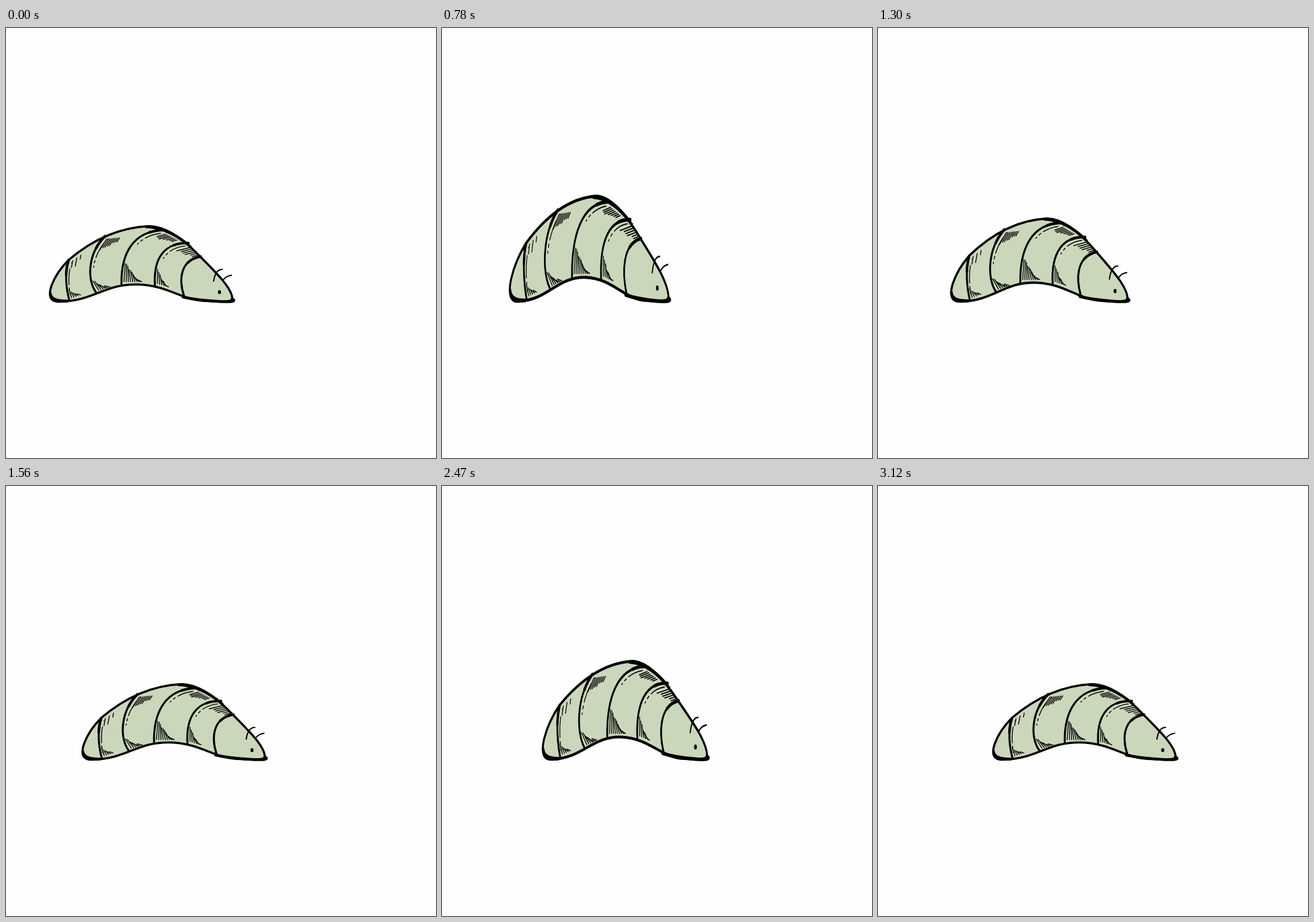
An HTML page with a canvas for the animation above (3250 ms loop, 700 by 700 pixels).

```html
<!DOCTYPE html>
<html lang="en">
<head>
<meta charset="utf-8">
<title>Crawling grub</title>
<style>
  html, body { margin: 0; height: 100%; overflow: hidden; background: #fefefe; }
  canvas { display: block; width: 100vmin; height: 100vmin; }
</style>
</head>
<body>
<canvas width="700" height="700"></canvas>
<script>
const ctx = document.querySelector('canvas').getContext('2d');
const STEP = 130, STEPS = 25, CYCLE = 12;
const GROUND = 447, NOSE = 370.5, LENGTH = 302, HEIGHT = 125;

const body = new Path2D(`M77 443.5 C64 437 75 405 102 377.5 C132 352 176 325 233 322.5
  C262 323 291 346 314 370 C345 401 368 424 368.5 441 C367 447 345 445.5 330 444.5
  C288 445 265 419 215 417.5 C160 416 145 444 88 445.5 Q80 445.5 77 443.5Z`);
const thickBack = new Path2D('M228 323.5 Q264 325 298 354');
const thickBelly = new Path2D('M288 438 Q310 443 345 445 T368 441 M72 432 Q73 445 100 444.5');
const feelers = new Path2D('M338 412 Q341 393 352 393 M354 409.5 Q358 404 367 402.5');

// Each ring runs from the back to the belly; "slope" is that of the belly to its right.
const ring = (curve, slope, crown, foot) => ({ curve, slope, crown, foot });
const rings = [
  ring([102, 378, 95, 398, 98, 425, 103, 443], -0.3, 3, 5),
  ring([161, 339, 132, 368, 132, 412, 147, 431], -0.3, 8, 6),
  ring([257, 329, 205, 330, 187, 370, 188, 417], 0, 7, 9),
  ring([297, 350, 250, 349, 240, 385, 242.5, 420], 0.3, 7, 6),
  ring([317, 372, 283, 378, 281, 410, 290, 437], 0, 0, 0)
];

function pointOn([ax, ay, bx, by, cx, cy, dx, dy], t) {
  const u = 1 - t;
  const mix = (a, b, c, d) => u ** 3 * a + 3 * u * u * t * b + 3 * u * t * t * c + t ** 3 * d;
  return [mix(ax, bx, cx, dx), mix(ay, by, cy, dy)];
}

function ringPath([x, y, ...rest], shift = 0) {
  const path = new Path2D();
  path.moveTo(x + shift, y + shift);
  path.bezierCurveTo(...rest.map(v => v + shift));
  return path;
}

let seed = 7;
const random = () => (seed = seed * 16807 % 2147483647) / 2147483647;

// Ink strokes below the back and above the belly, to the right of each ring.
function shade({ curve, slope, crown, foot }, next) {
  const path = new Path2D();
  const [topX, topY] = curve, [lowX, lowY] = curve.slice(-2);
  const [backX, backY] = pointOn(curve, 0.3);
  const alongX = next.curve[0] - topX, alongY = next.curve[1] - topY;
  const along = 24 / Math.hypot(alongX, alongY);
  const length = 18 / Math.hypot(backX - topX, backY - topY);
  for (let i = 1; i <= crown; i++) {
    const t = i / crown, size = length * (1.1 - 0.7 * t) * (0.75 + 0.5 * random());
    const x = topX + alongX * along * t, y = topY + alongY * along * t + 5;
    path.moveTo(x, y);
    path.lineTo(x + (backX - topX) * size, y + (backY - topY) * size);
  }
  for (let i = 0; i < foot; i++) {
    const [x, y] = pointOn(curve, 0.72 + 0.24 * i / foot + 0.03 * random());
    const endX = lowX + 4 + 3.6 * i, endY = lowY - 4 + 3.6 * i * slope;
    path.moveTo(x + 3 + 2.6 * i, Math.min(y + 3.6 * i * slope, endY - 2));
    path.lineTo(endX, endY);
  }
  return path;
}

const shading = rings.slice(0, -1).map((r, i) => shade(r, rings[i + 1]));

function stroke(path, width, dash = []) {
  ctx.lineWidth = width;
  ctx.setLineDash(dash);
  ctx.stroke(path);
}

// The tail is drawn up in the first half of a cycle, the nose reaches out in the second.
function pose(step) {
  const cycle = step < CYCLE ? 0 : 1, phase = step - cycle * CYCLE;
  const bend = Math.min(phase, CYCLE - phase);
  const reach = Math.max(0, phase / 6 - 1);
  const slip = 3 * cycle * Math.min(1, phase / 4);
  const stride = (53 + 13 * cycle) * reach * (1.2 - 0.2 * reach);
  return { lift: 6 * bend + 0.06 * bend ** 3, nose: NOSE + 53 * cycle - slip + stride };
}

function draw(step) {
  const { lift, nose } = pose(step);
  ctx.setTransform(1, 0, 0, 1, 0, 0);
  ctx.fillStyle = '#fefefe';
  ctx.fillRect(0, 0, 700, 700);
  ctx.translate(nose, GROUND);
  ctx.scale(1 - 0.8 * lift / LENGTH, 1 + lift / HEIGHT);
  ctx.translate(-NOSE, -GROUND);
  ctx.fillStyle = '#cbd7ba';
  ctx.fill(body);
  ctx.strokeStyle = ctx.fillStyle = '#000';
  ctx.lineCap = ctx.lineJoin = 'round';
  stroke(body, 3.5);
  stroke(thickBack, 4.4);
  stroke(thickBelly, 4.4);
  stroke(feelers, 2.1);
  for (const { curve } of rings) {
    stroke(ringPath(curve), 3.2);
    stroke(ringPath(curve), 4.2, [24, 500]);
  }
  rings.slice(0, -1).forEach(({ curve }, i) => {
    stroke(ringPath(curve, 4.5), 1.4, [0, 10, 26, 5, 4, 5, 2, 500]);
    stroke(shading[i], 1.4);
  });
  ctx.beginPath();
  ctx.ellipse(347.5, 430, 2.5, 3.2, 0, 0, 2 * Math.PI);
  ctx.fill();
}

const start = performance.now();
function tick() {
  draw(Math.floor((performance.now() - start) / STEP) % STEPS);
  requestAnimationFrame(tick);
}
tick();
</script>
</body>
</html>
```
